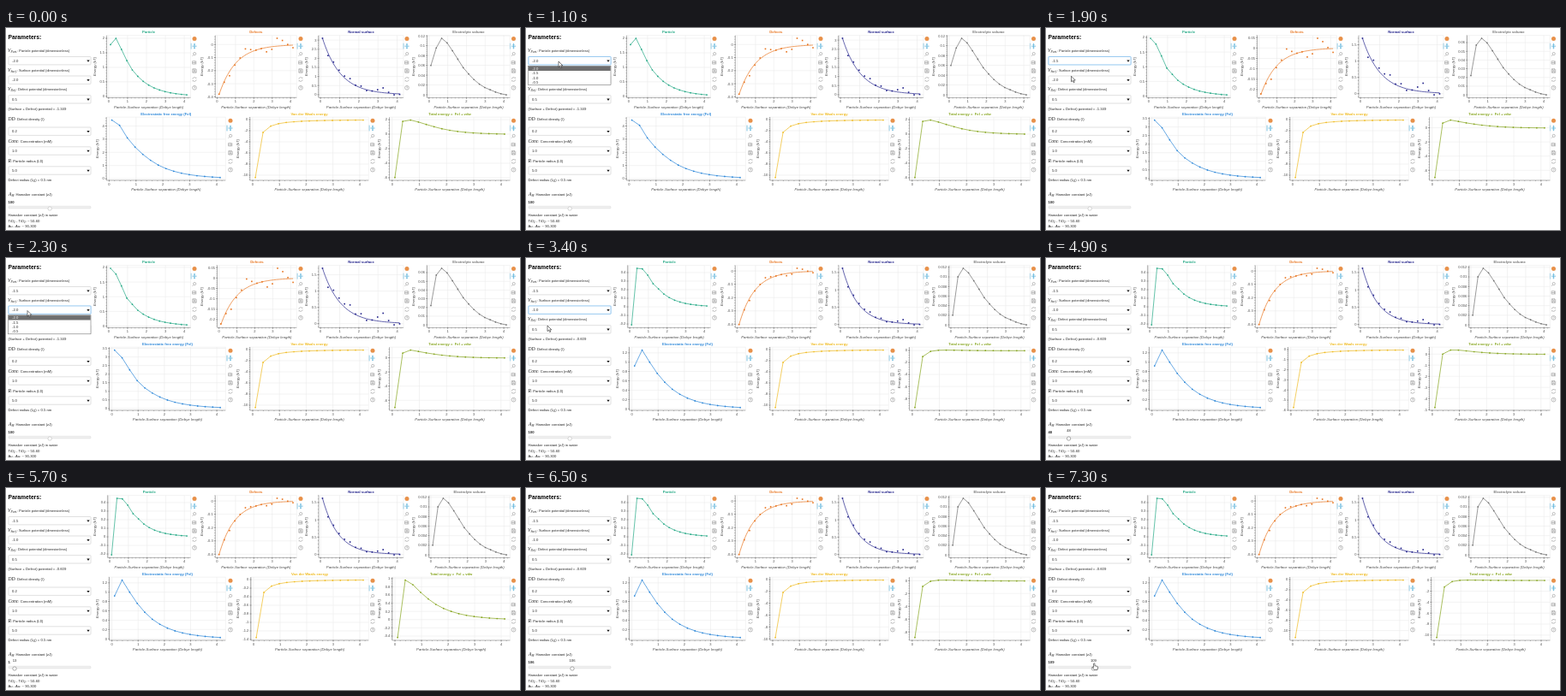
An HTML page for the animation above (7400 ms loop, 600 by 236 pixels).

```html
<!DOCTYPE html>
<html lang="en">
<head>
<meta charset="utf-8">
<title>Interaction energy explorer</title>
<style>
  html, body { margin: 0; width: 100%; height: 100%; overflow: hidden; background: #fff; }
  svg { display: block; width: 600px; height: 236px; }
  text { font: 4.2px "Liberation Sans", Arial, sans-serif; fill: #222; }
  .head { font-size: 6.7px; font-weight: bold; fill: #000; }
  .math { font: italic 5.6px "Liberation Serif", "Noto Serif", serif; }
  .sub { font-size: 3.8px; }
  .low { font-size: 3px; }
  .bold { font-weight: bold; }
  .title { font-weight: bold; text-anchor: middle; }
  .axis { font-size: 4.3px; font-style: italic; text-anchor: middle; fill: #444; }
  .tick { font-size: 4px; fill: #444; }
  .mid { text-anchor: middle; }
  .end { text-anchor: end; }
  .grid { stroke: #e6e6e6; stroke-width: .5; fill: none; }
  .rule { stroke: #555; stroke-width: .4; fill: none; }
  .tool { stroke: #a4a4a4; stroke-width: .7; fill: none; }
  .pan { stroke: #45a9d6; stroke-width: .7; fill: none; }
</style>
</head>
<body>
<svg viewBox="0 0 600 236">
  <g id="tools"></g>
  <g id="plots"></g>
  <g id="panel"></g>
  <g id="cursor">
    <path id="arrow" d="M0 0V6.6L1.6 5.2L2.7 7.6L3.8 7.1L2.7 4.8H4.8Z" fill="#fff" stroke="#222" stroke-width=".6"/>
    <path id="hand" d="M1.6 .6Q2.4 -.2 3 .8V3.2L6 3.9Q6.8 4.2 6.6 5.2L6 8H2.6L.2 5.2Q.2 4.2 1.6 5Z" fill="#fff" stroke="#222" stroke-width=".6"/>
  </g>
</svg>
<script>
const LOOP = 7400, STEP = 100, N = 15;
const $ = id => document.getElementById(id);
const H = Array.from({ length: N }, (_, i) => 0.1 + 0.288 * i);
const r2 = v => Math.round(v * 100) / 100;

const text = (x, y, s, cls = "", more = "") =>
  `<text x="${r2(x)}" y="${r2(y)}" class="${cls}" ${more}>${s}</text>`;
const path = (d, cls, more = "") => `<path d="${d}" class="${cls}" ${more}/>`;
const rect = (x, y, w, h, more) => `<rect x="${x}" y="${y}" width="${w}" height="${h}" ${more}/>`;

// Extends a few leading values by geometric decay
function decay(head, ratio = 0.75) {
  const out = head.slice();
  while (out.length < N) out.push(out[out.length - 1] * ratio);
  return out;
}

// Piecewise linear value of [time, ...values] rows
function track(rows, t) {
  let i = 0;
  while (i < rows.length - 2 && t >= rows[i + 1][0]) i++;
  const a = rows[i], b = rows[i + 1];
  const k = Math.min(1, Math.max(0, (t - a[0]) / (b[0] - a[0])));
  return a.slice(1).map((v, j) => v + (b[j + 1] - v) * k);
}

/* ---- model ---- */
const particle = [
  decay([1.78, 2, 1.62, 1.23, 0.91, 0.69]),
  decay([1.97, 1.77, 1.37, 0.95, 0.74, 0.54]),
  decay([-0.21, 0.45, 0.443, 0.37, 0.27, 0.21, 0.15], 0.72)
];
const fel = [
  decay([4.45, 4.05, 3.1, 2.4, 1.85, 1.4], 0.74),
  decay([3.4, 2.95, 2.25, 1.62, 1.2, 0.9], 0.74),
  decay([0.92, 1.26, 1, 0.76, 0.57, 0.42], 0.74)
];
const bulk = [1, .92, .78, .63, .48, .37, .27, .19, .13, .09, .05, .02, 0];
const electrolyte = [[.115, .52, .83], [.065, .34, .88], [.0118, .17, .85]]
  .map(([peak, a, b]) => [a, b, ...bulk].map(v => v * peak));
const defectNoise = [.005, -.007, -.033, -.007, .007, .047, .02, 0, 0, -.033, -.02, .06, .04, .007, -.02];
const normalNoise = [0, -.14, .1, .1, .1, .2, .02, .1, -.05, 0, .12, .26, .05, -.07, -.03];
const defect = [[-.385, .92, 1], [-.225, .92, .9], [-.405, .85, .5]];
const normal = [[3.1, .95, 1], [1.7, .95, 1], [1.62, .82, .4]];

// Sphere and plate attraction, radius of five Debye lengths
function vdw(h, A) {
  const R = 5;
  return -A * 0.00227 * (R / h + R / (h + 2 * R) + Math.log(h / (h + 2 * R)));
}

/* ---- plots ---- */
const TOP = [8.7, 81.4], LOW = [104.2, 178];
const frames = {
  particle: { base: 112, right: 215.5, rows: TOP, name: "Particle", color: "#22a884" },
  defects: { base: 237.4, right: 339.3, rows: TOP, name: "Defects", color: "#e8731c" },
  normal: { base: 359.4, right: 464, rows: TOP, name: "Normal surface", color: "#20208a" },
  bulk: { base: 483.8, right: 588.4, rows: TOP, name: "Electrolyte volume", color: "#707070" },
  fel: { base: 115, right: 256.3, rows: LOW, name: "Electrostatic free energy (Fel)", color: "#2a86d8" },
  vdw: { base: 279, right: 423.3, rows: LOW, name: "Van der Waals energy", color: "#efbb22" },
  total: { base: 444, right: 588.4, rows: LOW, name: "Total energy =&#160; Fel + vdw", color: "#86a51e" }
};

function tickStep(span) {
  let best = 1, miss = Infinity;
  for (let e = -4; e < 3; e++)
    for (const m of [1, 2, 5]) {
      const s = m * 10 ** e, d = Math.abs(6 - span / s);
      if (d < miss) { miss = d; best = s; }
    }
  return best;
}

function ticks(lo, hi, s) {
  const out = [];
  for (let k = Math.ceil(lo / s); k * s <= hi; k++) out.push(+(k * s).toFixed(6) || 0);
  return out;
}

const labelWidth = v => [...String(v)]
  .reduce((w, c) => w + (c === "." ? .278 : c === "-" ? .333 : .556) * 4, 0);

function plot(f, ys, curve) {
  const [top, bottom] = f.rows;
  const all = curve ? ys.concat(H.map(curve)) : ys;
  const min = Math.min(...all), max = Math.max(...all), pad = (max - min) * 0.05;
  const lo = min - pad, hi = max + pad, s = tickStep(hi - lo), yt = ticks(lo, hi, s);
  const left = f.base + Math.max(...yt.map(labelWidth));
  const h0 = H[0], h1 = H[N - 1], hp = (h1 - h0) * 0.05;
  const X = h => r2(left + (h - h0 + hp) / (h1 - h0 + 2 * hp) * (f.right - left));
  const Y = v => r2(bottom - (v - lo) / (hi - lo) * (bottom - top));
  const xt = ticks(h0 - hp, h1 + hp, 1), mid = (left + f.right) / 2;

  let grid = `M${left} ${top}H${f.right}V${bottom}H${left}Z`;
  let rule = `M${left} ${top}V${bottom}H${f.right}`;
  let out = "";
  for (const v of xt) {
    grid += `M${X(v)} ${top}V${bottom}`;
    rule += `M${X(v)} ${bottom - .6}v2.2`;
    out += text(X(v), bottom + 6, v, "tick mid");
  }
  for (const v of yt) {
    grid += `M${left} ${Y(v)}H${f.right}`;
    rule += `M${left + .6} ${Y(v)}h-2.2`;
    out += text(left - 2.6, Y(v) + 1.4, v, "tick end");
  }
  for (const v of ticks(h0 - hp, h1 + hp, .2)) rule += `M${X(v)} ${bottom}v1`;
  for (const v of ticks(lo, hi, s / 5)) rule += `M${left} ${Y(v)}h-1`;

  const line = curve
    ? Array.from({ length: 61 }, (_, i) => h0 + (h1 - h0) * i / 60).map(h => [X(h), Y(curve(h))])
    : H.map((h, i) => [X(h), Y(ys[i])]);
  const dots = H.map((h, i) => curve
    ? rect(X(h) - .8, Y(ys[i]) - .8, 1.6, 1.6, `fill="${f.color}"`)
    : `<circle cx="${X(h)}" cy="${Y(ys[i])}" r=".85" fill="${f.color}"/>`).join("");

  const cy = (top + bottom) / 2, lx = f.base - 7.2;
  return path(grid, "grid") + path(rule, "rule") + out
    + path("M" + line.join("L"), "", `fill="none" stroke="${f.color}" stroke-width=".7"`) + dots
    + text(mid, top - 2.4, f.name, "title", `style="fill:${f.color}"`)
    + text(mid, bottom + 12.2, "Particle-Surface separation (Debye length)", "axis")
    + text(lx, cy, "Energy (kT)", "axis", `transform="rotate(-90 ${lx} ${cy})"`);
}

function noisy(f, [amp, len, gain], noise) {
  const curve = h => amp * Math.exp(-(h - H[0]) / len);
  return plot(f, H.map((h, i) => curve(h) + noise[i] * gain), curve);
}

function drawPlots(s, A) {
  const w = H.map(h => vdw(h, A));
  return plot(frames.particle, particle[s])
    + noisy(frames.defects, defect[s], defectNoise)
    + noisy(frames.normal, normal[s], normalNoise)
    + plot(frames.bulk, electrolyte[s])
    + plot(frames.fel, fel[s])
    + plot(frames.vdw, w)
    + plot(frames.total, w.map((v, i) => v + fel[s][i]));
}

function toolbar(x, y) {
  const at = (dy, d, cls = "tool") => path(d, cls, `transform="translate(${x} ${y + dy})"`);
  return `<circle cx="${x}" cy="${y}" r="2.5" fill="#e8914a"/>`
    + at(8.7, "M-4 -3.4V3.4M-2.6 0H2.6M0 -2.6V2.6M-1 -1.8L0 -2.7L1 -1.8M-1 1.8L0 2.7L1 1.8", "pan")
    + at(18, "M-1.4 -.4a1.6 1.6 0 1 0 3.2 0a1.6 1.6 0 1 0 -3.2 0M-1 .9L-2.5 2.4")
    + at(28, "M-2.4 -1.8H1V1.6H-2.4ZM1.8 -2V2M-2.4 0H1")
    + at(37.5, "M-2.2 -2.2H1.5L2.2 -1.5V2.2H-2.2ZM-1.1 -2.2V-.7H1.1V-2.2M-1.1 2.2V.6H1.1V2.2")
    + at(47.5, "M-2.2 -.4A2.2 2.2 0 0 1 1.9 -1.2V-2.4M2.2 .4A2.2 2.2 0 0 1 -1.9 1.2V2.4")
    + at(57.3, "M-2.4 0a2.4 2.4 0 1 0 4.8 0a2.4 2.4 0 1 0 -4.8 0M-.8 -.6Q0 -1.8 .8 -.6Q.8 0 0 .5M0 1V1.5");
}

/* ---- controls ---- */
const OPTIONS = ["-2.0", "-1.5", "-1.0", "-0.5"];
const span = (s, cls, dy = 0) => `<tspan class="${cls}" dy="${dy}">${s}</tspan>`;
const potential = (y, sub, word) => text(2, y, span("V", "math") + span(sub, "math sub", 1)
  + `<tspan dy="-1" font-size="4">: ${word} potential (dimensionless)</tspan>`, "", 'style="font-size:4px"');
const symbol = (y, s, rest) => text(2.5, y, span(s, "math") + ": " + rest);

function select(y, value, focus) {
  const edge = focus ? "#66afe9" : "#ccc";
  return (focus ? rect(2.3, y - .6, 97.4, 10.6, 'rx="1.2" fill="#d6eaf9"') : "")
    + rect(3, y, 96, 9.4, `rx=".8" fill="#fff" stroke="${edge}" stroke-width=".6"`)
    + text(7, y + 6.2, value)
    + path(`M94.3 ${y + 3.9}h3.4l-1.7 2.4z`, "", 'fill="#111"');
}

function menu(y, hot) {
  return rect(2.5, y, 96.5, 22, 'fill="#fff" stroke="#777" stroke-width=".6"')
    + rect(2.8, y + .3 + hot * 5.3, 95.9, 5.4, 'fill="#6e6e6e"')
    + OPTIONS.map((o, i) => text(7, y + 4.6 + i * 5.3, o, "", i === hot ? 'style="fill:#fff"' : "")).join("");
}

function slider(v, tip) {
  const x = 3.85 + 0.473 * v;
  return text(2.5, 204.6, v, "bold")
    + rect(3, 208.2, 96, 2.6, 'rx=".7" fill="#f0f0f0" stroke="#d0d0d0" stroke-width=".4"')
    + `<circle cx="${x}" cy="211" r="2.2" fill="#fff" stroke="${tip ? "#777" : "#bbb"}" stroke-width=".6"/>`
    + (tip ? rect(x - 4.8, 198, 9.6, 7, 'fill="#fff"') + text(x, 202.6, v, "mid") : "");
}

function drawPanel(t, v) {
  const first = t < 1400 ? 0 : 1, second = t < 2600 ? 0 : 2;
  const sub = n => span(n, "low", .8);
  const LD = `(L${sub("D")}<tspan dy="-.8">)</tspan>`;
  const ti = `TiO${sub("2")}`;
  let s = text(2.5, 13.4, "Parameters:", "head")
    + potential(28, "Part.", "Particle") + select(33.5, OPTIONS[first], t >= 1000 && t < 2200)
    + potential(50.6, "Surf.", "Surface") + select(56, OPTIONS[second], t >= 2200 && t < 4200)
    + potential(73.2, "Def.", "Defect") + select(78.6, "0.5")
    + text(2.5, 96, `(Surface + Defect) potential = ${t < 3400 ? "-1.349" : "-0.609"}`)
    + symbol(107.8, "DD", "Defect density (/)") + select(116, "0.2")
    + symbol(133.8, "Conc", "Concentration (mM)") + select(138.8, "1.0")
    + symbol(156.6, "R", "Particle radius " + LD) + select(161.8, "5.0")
    + text(2.5, 179, `Defect radius ${LD} = 0.5 nm`)
    + text(3, 195.6, span("A", "math") + span("H", "math sub", 1) + '<tspan dy="-1">: Hamaker constant (zJ)</tspan>')
    + slider(v, t >= 4200)
    + text(2.5, 220.4, "Hamaker constant (zJ) in water")
    + text(2.5, 227, `${ti}<tspan dy="-.8"> - TiO</tspan>${sub("2")}<tspan dy="-.8">: ~ 50-60</tspan>`)
    + text(2.5, 233.4, "Au - Au: ~ 90-300");
  if (t >= 1000 && t < 1400) s += menu(44.3, t < 1200 ? 0 : 1);
  if (t >= 2200 && t < 2600) s += menu(66.8, t < 2400 ? 0 : t < 2500 ? 1 : 2);
  return s;
}

/* ---- timeline ---- */
const drag = [[4100, 100], [5000, 42], [5600, 13.4], [5700, 13], [6500, 106], [6700, 111], [7000, 109], [LOOP, 109]];
const mouse = [
  [100, 526, 184], [300, 390, 70], [500, 190, 8], [800, 38, 39], [1100, 38, 39], [1300, 34, 51],
  [1800, 34, 51], [2000, 25, 61.5], [2300, 25, 61.5], [2500, 25, 79], [3400, 25, 79],
  [4000, 52, 207], [4100, 52, 207], [7300, 54, 204.5], [LOOP, 54, 204.5]
];
const constant = t => Math.round(track(drag, t)[0]);

let plotKey = "", last = -1;
function show(t) {
  if (t === last) return;
  last = t;
  const stage = t < 1800 ? 0 : t < 3400 ? 1 : 2;
  const A = constant(t - STEP), key = stage + ":" + A;
  if (key !== plotKey) {
    plotKey = key;
    $("plots").innerHTML = drawPlots(stage, A);
  }
  $("panel").innerHTML = drawPanel(t, constant(t));
  const [x, y] = track(mouse, t), onSlider = t >= 4000;
  $("cursor").setAttribute("transform", `translate(${r2(x)} ${r2(y)})`);
  $("cursor").style.display = (t >= 100 && t < 4200) || t >= 7300 ? "" : "none";
  $("arrow").style.display = onSlider ? "none" : "";
  $("hand").style.display = onSlider ? "" : "none";
}

$("tools").innerHTML = [220, 344, 468, 592.5].map(x => toolbar(x, 12.5)).join("")
  + [262, 428, 592.5].map(x => toolbar(x, 108.3)).join("");

const start = performance.now();
function tick() {
  const t = (performance.now() - start) % LOOP;
  show(Math.floor(t / STEP) * STEP);
  requestAnimationFrame(tick);
}
tick();
</script>
</body>
</html>
```
